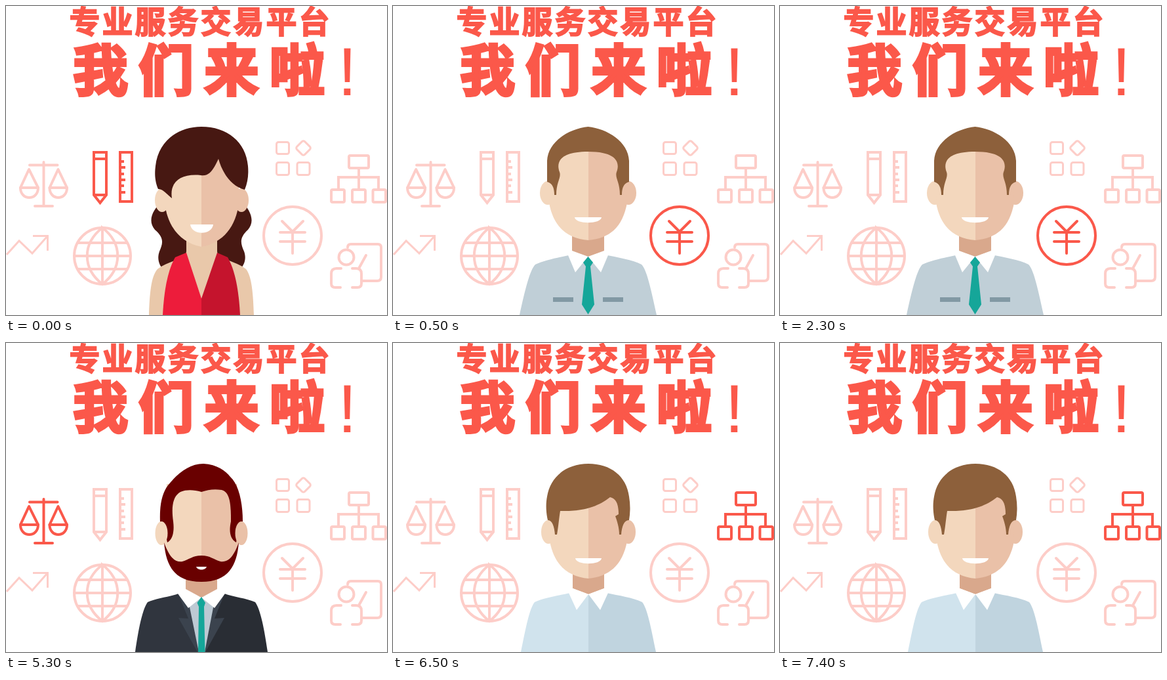
An HTML page for the animation above (8000 ms loop, 581 px wide and 471 px high).

```html
<!DOCTYPE html>
<html lang="zh">
<head>
<meta charset="utf-8">
<style>
  html, body { margin: 0; width: 100%; height: 100%; overflow: hidden; background: #fff; }
  svg { display: block; width: 581px; height: 471px; }
  .title { fill: #fb584a; stroke: #fb584a; font-family: "Noto Sans CJK SC", "Noto Sans CJK", sans-serif; font-weight: 900; }
  .icon { fill: none; stroke: #fdcdc8; stroke-width: 4; stroke-linecap: round; stroke-linejoin: round; }
  .icon.on { stroke: #fa584a; }
  .sharp { stroke-linecap: butt; stroke-linejoin: miter; }
  .thin { stroke-width: 3; }
  .scene { visibility: hidden; }
  .scene.on { visibility: visible; }
  .light { fill: #f3d7bd; }
  .shade { fill: #eac1a8; }
  .neck { fill: #d9a88c; }
  .brown { fill: #8d603b; }
  .dark { fill: #471812; }
  .maroon { fill: #690000; }
  .white { fill: #fff; }
  .tie { fill: #15a699; }
</style>
</head>
<body>
<svg viewBox="0 0 581 471">
  <g class="title">
    <text x="96.500" y="41" font-size="47" letter-spacing="3" stroke-width="1.800">专业服务交易平台</text>
    <text x="102" y="129" font-size="84" letter-spacing="16" stroke-width="4">我们来啦</text>
    <text x="520.500" y="136" font-size="104" text-anchor="middle" font-weight="400" font-family="Liberation Sans, sans-serif" stroke="none">!</text>
  </g>

  <g class="icon" id="scales">
    <path d="M57.500 238V305M36 242.500H78.500M44 305H71M35 249L22 277H49ZM79.500 249L66.500 277H93Z"/>
    <path d="M22 277C22 297 49 297 49 277M66.500 277C66.500 297 93 297 93 277"/>
  </g>
  <g class="icon sharp" id="tools">
    <path d="M134 223H153V288L143.500 300L134 288ZM134 233H153M134 288H153"/>
    <path d="M174 223H192V298H174ZM174 237H180M174 246H182M174 256H180M174 265H182M174 274H180M174 284H182"/>
  </g>
  <g class="icon thin">
    <rect x="412.500" y="207.500" width="19" height="18" rx="3"/>
    <rect x="412.500" y="238.500" width="19" height="19" rx="3"/>
    <rect x="444" y="238.500" width="19" height="19" rx="3"/>
    <rect x="445" y="208" width="17" height="17" rx="3" transform="rotate(45 453.500 216.500)"/>
  </g>
  <g class="icon sharp" id="chart">
    <rect x="523" y="228" width="30" height="19" rx="2"/>
    <path d="M538 247V279M507 279V261H568V279"/>
    <rect x="496" y="280" width="20" height="19" rx="2"/>
    <rect x="528" y="280" width="20" height="19" rx="2"/>
    <rect x="559.500" y="280" width="19.500" height="19" rx="2"/>
  </g>
  <g class="icon sharp">
    <circle cx="147" cy="381" r="43"/>
    <path d="M147 338C116 362 116 400 147 424C178 400 178 362 147 338V424"/>
    <path d="M104 381H190M109 361H185M109 401H185"/>
  </g>
  <g class="icon" id="yen">
    <circle cx="437" cy="350" r="44"/>
    <path d="M421 328L437 344L453 328M418 345H456M418 359H456M437 345V377"/>
  </g>
  <path class="icon thin sharp" d="M1 379L20 358L40 377L63 351M41 350.500H63.500V373"/>
  <g class="icon">
    <circle cx="519" cy="383" r="11.500"/>
    <path d="M521 368Q521 363 526 363H567Q572 363 572 368V413Q572 419 566 419H544M549 380L538 400"/>
    <path d="M511 400H504Q496 400 496 408V423Q496 429 502 429H510M528 400H534Q542 400 542 408V423Q542 429 536 429H528"/>
  </g>

  <g class="scene" id="woman">
    <path class="dark" d="M240 295C222 312 216 328 227 341C242 354 239 362 234 374C230 385 233 396 242 404H354C364 396 367 385 363 374C358 362 355 354 369 341C380 328 374 312 357 295Z"/>
    <path fill="#e9c8aa" d="M218 471C219 440 221 412 231 401C248 388 275 386 275 374V345H322V374C322 386 350 388 366 401C375 412 377 440 378 471Z"/>
    <path fill="#ed1c3b" d="M239 471C241 432 247 402 258 383L275 376L298 446V471Z"/>
    <path fill="#c5142d" d="M357 471C355 432 349 402 338 383L322 376L298 446V471Z"/>
    <ellipse class="light" cx="238" cy="296" rx="11" ry="18"/>
    <ellipse class="shade" cx="359" cy="296" rx="11" ry="18"/>
    <path class="light" d="M298 225H242V300C246 336 266 361 298 367Z"/>
    <path class="shade" d="M298 225H355V300C351 336 331 361 298 367Z"/>
    <path class="dark" d="M232 279C226 265 227 252 228 244C232 207 261 184 298 184C337 184 366 207 369 244C370 256 369 268 364 280C344 275 330 255 324 233C316 250 310 260 297 258C267 255 249 268 253 293C246 288 239 278 232 279Z"/>
    <path class="white" d="M281 333H316C314 350 283 350 281 333Z"/>
  </g>

  <g class="scene" id="clerk">
    <path fill="#c0cfd7" d="M193 471C202 430 209 402 217 394C232 387 255 383 272 379H322C342 383 366 387 379 394C387 402 393 430 402 471Z"/>
    <path class="neck" d="M273 345H322V374L297.500 382L273 374Z"/>
    <path class="white" d="M273 373L267 380L278 406L297.500 382ZM322 373L328 380L317 406L297.500 382Z"/>
    <path class="tie" d="M297.500 382L305 391L301 397L307 455L297.500 470L288 455L294 397L290 391Z"/>
    <path fill="#8299a4" d="M244 444H275V451H244ZM320 444H351V451H320Z"/>
    <ellipse class="light" cx="236" cy="285" rx="12" ry="18"/>
    <ellipse class="shade" cx="359" cy="285" rx="12" ry="18"/>
    <path class="light" d="M298 215H245L238 300C245 338 266 354 298 357Z"/>
    <path class="shade" d="M298 215H350L357 300C350 338 330 354 298 357Z"/>
    <path class="brown" d="M235 268V236C236 207 268 187 297.500 184C327 187 359 207 360 236V268C352 270 349 277 349 288H346C346 268 338 262 341 253C346 240 343 222 297.500 222C252 222 249 240 254 253C257 262 249 268 249 288H246C246 277 243 270 235 268Z"/>
    <path class="white" d="M277 322H318C317 333 278 333 277 322Z"/>
  </g>

  <g class="scene" id="lawyer">
    <path fill="#30353e" d="M197 471C202 436 208 406 216 395C229 389 250 387 263 382H298V471Z"/>
    <path fill="#292d34" d="M399 471C394 436 388 406 380 395C367 389 346 387 333 382H298V471Z"/>
    <path fill="#3b434e" d="M263 383L278 420L263 419L292 471H304L333 419L318 420L333 383L298 405Z"/>
    <path fill="#bdc9d3" d="M278 393L294 471H303L318 393L298 387Z"/>
    <path class="neck" d="M274 345H322V377L298 388L274 377Z"/>
    <path class="white" d="M274 375L262 382L278 404L298 388ZM322 375L334 382L318 404L298 388Z"/>
    <path class="tie" d="M298 387L304 396L302 402L303.500 471H293L294 402L291.500 396Z"/>
    <path class="light" d="M298 215H245L241 304C248 340 270 358 298 360Z"/>
    <path class="shade" d="M298 215H352L355 304C348 340 326 358 298 360Z"/>
    <path class="maroon" d="M235 273C234 250 237 230 247 217C262 198 280 184 301 184C322 185 335 195 342 204C354 215 361 240 361 272C356 276 354 290 351 304C341 298 340 286 343 272C343 250 343 228 329 224C316 222 308 224 298 227C287 224 276 223 266 227C254 234 252 250 255 272C257 288 254 300 246 304C243 290 241 276 235 273Z"/>
    <ellipse class="light" cx="237" cy="290" rx="9.500" ry="18"/>
    <ellipse class="shade" cx="359" cy="290" rx="9.500" ry="18"/>
    <path class="maroon" d="M241 304C247 320 254 335 269 333C280 330 284 324 298 324C312 324 316 330 327 333C342 335 349 320 355 304C352 340 339 364 298 364C257 364 244 340 241 304Z"/>
    <path class="white" d="M290 341H306C304 347 292 347 290 341Z"/>
  </g>

  <g class="scene" id="manager">
    <path fill="#d0e3ed" d="M195 471C203 432 208 405 216 395C230 388 252 385 270 381L298 384V471Z"/>
    <path fill="#c0d4df" d="M401 471C393 432 388 405 380 395C366 388 344 385 326 381L298 384V471Z"/>
    <path class="neck" d="M274 345H322V374L298 383L274 374Z"/>
    <path class="white" d="M274 374L268 381L280 407L298 383ZM322 374L328 381L316 407L298 383Z"/>
    <ellipse class="light" cx="237" cy="288" rx="11" ry="18"/>
    <ellipse class="shade" cx="359" cy="288" rx="11" ry="18"/>
    <path class="light" d="M298 225H245L239 302C246 340 268 356 298 359Z"/>
    <path class="shade" d="M298 225H350L357 302C350 340 328 356 298 359Z"/>
    <path class="brown" d="M236 270C233 257 233 244 235 234C240 203 265 184 298 184C332 184 356 203 360 234C362 246 362 258 360 270C352 270 349 280 348 292H345C345 282 342 272 339 264L344 261C344 247 341 237 331 235C313 249 292 257 255 256C253 268 252 282 250 292H247C246 280 243 270 236 270Z"/>
    <path class="white" d="M278 328H318C317 339 279 339 278 328Z"/>
  </g>
</svg>
<script>
  const LOOP = 8000;
  const steps = [
    [0, "woman", "tools"],
    [500, "clerk", "yen"],
    [3500, "lawyer", "scales"],
    [6500, "manager", "chart"]
  ];
  const get = id => document.getElementById(id);
  let current = null;

  function show(step) {
    if (step === current) return;
    current = step;
    for (const s of steps) {
      for (const id of s.slice(1)) get(id).classList.toggle("on", s === step);
    }
  }

  const start = performance.now();
  function tick() {
    const t = (performance.now() - start) % LOOP;
    show(steps.filter(s => s[0] <= t).pop());
    requestAnimationFrame(tick);
  }
  tick();
</script>
</body>
</html>
```
